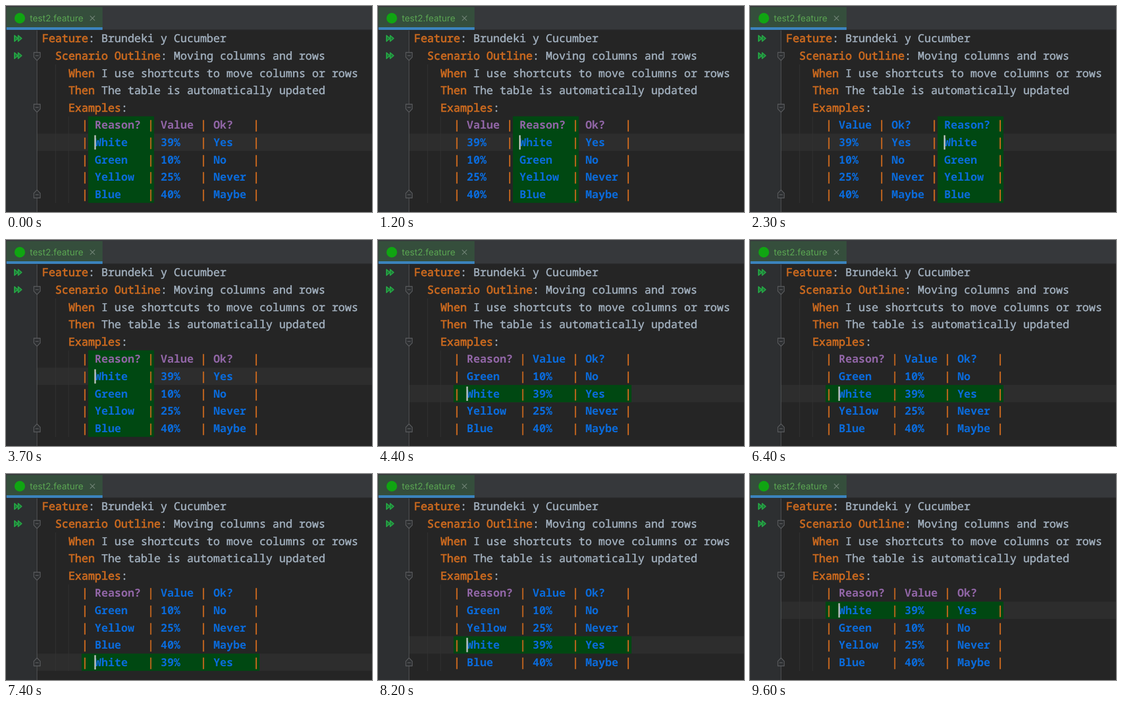
Recreate the animation shown at these times as an HTML page. Size 690 by 388 pixels, loop 9700 ms.

```html
<!DOCTYPE html>
<html lang="en">
<head>
<meta charset="utf-8">
<title>Moving columns and rows</title>
<style>
  html, body { margin: 0; width: 100%; height: 100%; overflow: hidden; background: #252525; }
  svg { display: block; width: 690px; height: 388px; }
  text { white-space: pre; text-rendering: geometricPrecision; }
  .code { font: 20.7px "Noto Sans Mono", "DejaVu Sans Mono", monospace; fill: #9fadbb; stroke: #9fadbb; stroke-width: .6; }
  .code rect { stroke: none; }
  .tab { font: 16.8px Inter, sans-serif; fill: #5aa552; }
  .keyword, .pipe { fill: #c7681f; stroke: #c7681f; stroke-width: .9; }
  .cell { font-weight: 700; fill: #0a6bdb; stroke: none; }
  .header { font-weight: 700; fill: #9065a5; stroke: none; }
  .icon { fill: #2d2f31; stroke: #5c5e60; stroke-width: 1.3; }
  .run { fill: #1f7a38; stroke: #25a244; stroke-width: 2; stroke-linejoin: round; }
</style>
</head>
<body>
<svg viewBox="0 0 690 388">
  <rect width="690" height="388" fill="#252525"/>
  <rect y="45" width="58" height="343" fill="#2d2f31"/>
  <rect width="690" height="45" fill="#36383b"/>
  <rect y="44" width="690" height="1.5" fill="#2b2c2e"/>
  <rect x="1" y="2" width="181" height="38" fill="#354e3c"/>
  <rect x="1" y="40" width="181" height="5" fill="#3b83bd"/>
  <circle cx="26" cy="23" r="10" fill="#10a512"/>
  <text class="tab" x="45" y="29">test2.feature</text>
  <path d="M158.500 18.500l9 9m0-9l-9 9" stroke="#718477" stroke-width="1.3"/>
  <rect id="caretLine" x="58" width="632" height="32.600" fill="#2d2d2d"/>
  <path d="M58.500 46V388" stroke="#515355" stroke-width="1.2"/>
  <path d="M93.500 110V371M118 208V371" stroke="#323232"/>
  <g id="gutter"></g>
  <g id="script" class="code"></g>
  <g id="table" class="code"></g>
</svg>
<script>
const LOOP = 9700, CHAR = 12.42, LEFT = 68, LINE = 32.6, FIRST_ROW = 5;
const $ = id => document.getElementById(id);
const colX = col => LEFT + col * CHAR;
const lineTop = line => 44.8 + line * LINE;
const put = (line, col, text, kind = "") =>
  `<text class="${kind}" x="${colX(col)}" y="${lineTop(line) + 23.6}">${text}</text>`;
const box = (x, y, w, h, fill) =>
  `<rect x="${x}" y="${y}" width="${w}" height="${h}" fill="${fill}"/>`;

// Column texts, header first; the first column and the first data row are the ones moved.
const columns = [
  ["Reason?", "White", "Green", "Yellow", "Blue"],
  ["Value", "39%", "10%", "25%", "40%"],
  ["Ok?", "Yes", "No", "Never", "Maybe"]
];
// [time, new position]
const columnMoves = [[0, 0], [700, 1], [2000, 2], [2500, 1], [2800, 0]];
const rowMoves = [[3900, 1], [4900, 2], [6000, 1], [6600, 2], [7200, 3], [7800, 2], [8300, 1], [8600, 0]];
const COLUMN_RECOLOR = 500, ROW_RECOLOR = 600;

const script = [
  [0, "Feature", ": Brundeki y Cucumber"],
  [2, "Scenario Outline", ": Moving columns and rows"],
  [4, "When", " I use shortcuts to move columns or rows"],
  [4, "Then", " The table is automatically updated"],
  [4, "Examples", ":"]
];
$("script").innerHTML = script.map(([col, keyword, rest], line) =>
  put(line, col, keyword, "keyword") + put(line, col + keyword.length, rest)).join("");

const runIcon = y =>
  `<path class="run" d="M16 ${y - 5.5}l6.500 5.500l-6.500 5.500zM23 ${y - 5.5}l6.500 5.500l-6.500 5.500z"/>`;
const foldIcon = (y, dir) =>
  `<path class="icon" d="M52.5 ${y - 7 * dir}h12v${9 * dir}l-6 ${6 * dir}l-6 ${-6 * dir}zM55.500 ${y - dir}h6"/>`;
$("gutter").innerHTML = runIcon(61) + runIcon(93.500) +
  foldIcon(94.5, 1) + foldIcon(192, 1) + foldIcon(354.5, -1);

const moveItem = (list, to) => {
  const [first, ...rest] = list;
  rest.splice(to, 0, first);
  return rest;
};
const latest = (moves, t) => moves.filter(move => move[0] <= t).pop();

function drawTable(position, rowMode, fresh) {
  const order = moveItem([0, 1, 2], rowMode ? 0 : position);
  const rows = [0, ...moveItem([1, 2, 3, 4], rowMode ? position : 0)];
  const caretRow = rowMode ? position + 1 : 1;
  const top = lineTop(FIRST_ROW), caretTop = lineTop(FIRST_ROW + caretRow);
  let col = 7, caretX = 0, selection = "", text = "";

  rows.forEach((_, r) => text += put(FIRST_ROW + r, 6, "|", "pipe"));
  for (const c of order) {
    const width = Math.max(...columns[c].map(s => s.length)) + 3;
    if (c === 0) {
      caretX = colX(col + 1) - 0.8;
      if (!rowMode) selection = box(colX(col), top, width * CHAR, 5 * LINE, "#004812");
    }
    rows.forEach((row, r) => {
      const purple = row === 0 && (!fresh || (rowMode && c === 0));
      text += put(FIRST_ROW + r, col + 1, columns[c][row], purple ? "header" : "cell");
      text += put(FIRST_ROW + r, col + width - 1, "|", "pipe");
    });
    col += width;
  }
  if (rowMode) selection = box(colX(6), caretTop, (col - 6) * CHAR, LINE, "#004812");
  $("caretLine").setAttribute("y", caretTop);
  $("table").innerHTML = selection + text + box(caretX, caretTop + 3, 3, 27, "#b9bfbb");
}

let shown = "";
function frame(now) {
  const t = now % LOOP;
  const rowMode = t >= rowMoves[0][0];
  const [start, position] = latest(rowMode ? rowMoves : columnMoves, t);
  const fresh = start > 0 && t - start < (rowMode ? ROW_RECOLOR : COLUMN_RECOLOR);
  const state = [position, rowMode, fresh];
  if (shown !== String(state)) {
    drawTable(...state);
    shown = String(state);
  }
  requestAnimationFrame(frame);
}
frame(0);
</script>
</body>
</html>
```
